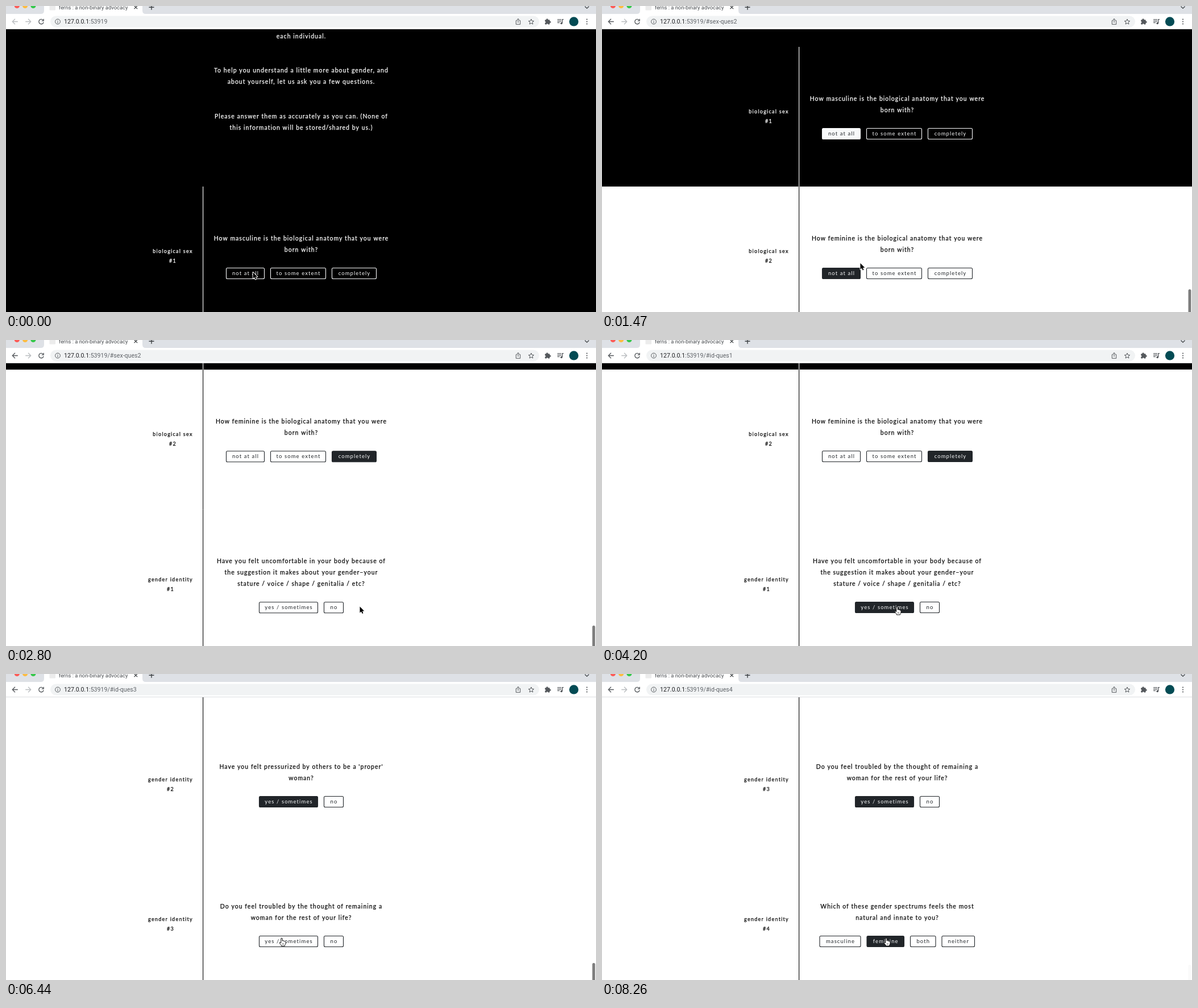
An HTML page with a canvas that plays this animation: 1038 by 539 pixels, repeating every 8.33 s.

```html
<!DOCTYPE html>
<html lang="en">
<head>
<meta charset="utf-8">
<title>Questionnaire</title>
<style>
html, body { margin: 0; width: 100%; height: 100%; overflow: hidden; background: #fff; }
canvas { display: block; width: 1038px; height: 539px; }
</style>
</head>
<body>
<canvas id="stage"></canvas>
<script>
const W = 1038, H = 539, LOOP = 8330, BAR = 41;
const canvas = document.getElementById('stage');
const ctx = canvas.getContext('2d');
const dpr = window.devicePixelRatio || 1;
canvas.width = W * dpr;
canvas.height = H * dpr;

const DARK = [33, 37, 41], LIGHT = [248, 249, 250];
const PAGE_FONT = 'Lato, sans-serif', UI_FONT = 'Roboto, sans-serif';

// Scroll jumps: start time, page offset reached, scrollbar thumb from and to
const SCROLL_MS = 520;
const jumps = [
  { at: 890, to: 246, thumb: [466, 499] },
  { at: 2290, to: 512, thumb: [470, 503] },
  { at: 4465, to: 758, thumb: [473, 506] },
  { at: 5655, to: 1004, thumb: [476, 509] },
  { at: 6775, to: 1250, thumb: [479, 512] }
];
const hashes = ['', '/#sex-ques2', '/#id-ques1', '/#id-ques2', '/#id-ques3', '/#id-ques4'];

// Pointer tip: time, x, y
const pointerPath = [
  [0, 434.5, 469], [1400, 434.5, 469], [1470, 454.5, 453], [1800, 622.5, 469.5],
  [3420, 622.5, 469.5], [3800, 519, 470], [4990, 519, 470], [5180, 515, 471],
  [6200, 515, 471], [6440, 485, 465], [7330, 485, 465], [7560, 500, 465]
];

// Buttons: left, right, text, time filled, time cleared
const degrees = (...marks) => [
  [387, 455, 'not at all'], [465, 563, 'to some extent'], [573, 652, 'completely']
].map((b, i) => b.concat(marks[i] || []));
const yesNo = on => [[445, 549, 'yes / sometimes', on], [559, 594, 'no']];

const sections = [
  { top: 318, h: 246, label: 'biological sex', no: 1, night: true,
    lines: ['How masculine is the biological anatomy that you were', 'born with?'],
    buttons: degrees([60]) },
  { top: 564, h: 246, label: 'biological sex', no: 2,
    lines: ['How feminine is the biological anatomy that you were', 'born with?'],
    buttons: degrees([1310, 1475], [], [1740]) },
  { top: 810, h: 266, label: 'gender identity', no: 1,
    lines: ['Have you felt uncomfortable in your body because of',
      'the suggestion it makes about your gender–your',
      'stature / voice / shape / genitalia / etc?'],
    buttons: yesNo(3760) },
  { top: 1076, h: 246, label: 'gender identity', no: 2,
    lines: ["Have you felt pressurized by others to be a 'proper'", 'woman?'],
    buttons: yesNo(5290) },
  { top: 1322, h: 246, label: 'gender identity', no: 3,
    lines: ['Do you feel troubled by the thought of remaining a', 'woman for the rest of your life?'],
    buttons: yesNo(6440) },
  { top: 1568, h: 246, label: 'gender identity', no: 4,
    lines: ['Which of these gender spectrums feels the most', 'natural and innate to you?'],
    buttons: [[382.5, 455.5, 'masculine'], [465.5, 532, 'feminine', 7560],
      [542, 587.5, 'both'], [597.5, 656, 'neither']] }
];

const intro = [
  [53, 'each individual.'],
  [113.5, 'To help you understand a little more about gender, and'],
  [133.5, 'about yourself, let us ask you a few questions.'],
  [194.5, 'Please answer them as accurately as you can. (None of'],
  [214.5, 'this information will be stored/shared by us.)']
];

const clamp = v => Math.min(1, Math.max(0, v));
const swing = p => 0.5 - Math.cos(Math.PI * clamp(p)) / 2;
const mix = (a, b, k) => `rgb(${a.map((v, i) => Math.round(v + (b[i] - v) * k)).join()})`;

function text(str, x, y, font, color, spacing = 0, align = 'left') {
  ctx.font = font;
  ctx.letterSpacing = spacing + 'px';
  ctx.textAlign = align;
  ctx.fillStyle = color;
  ctx.fillText(str, x, y);
}

// Page copy is a touch heavier than the regular weight
function copy(str, x, y, size, color, spacing) {
  text(str, x, y, `${size}px ${PAGE_FONT}`, color, spacing, 'center');
  ctx.strokeStyle = color;
  ctx.lineWidth = 0.25;
  ctx.strokeText(str, x, y);
}

const bodyLine = (str, y, color) => copy(str, 519.5, y, 10.5, color, 1.03);

function box(x, y, w, h, r, fill) {
  ctx.beginPath();
  ctx.roundRect(x, y, w, h, r);
  ctx.fillStyle = fill;
  ctx.fill();
}

function disc(x, y, r, fill) {
  ctx.beginPath();
  ctx.arc(x, y, r, 0, Math.PI * 2);
  ctx.fillStyle = fill;
  ctx.fill();
}

function stroke(d, x, y, color, width = 1.2) {
  ctx.save();
  ctx.translate(x, y);
  ctx.strokeStyle = color;
  ctx.lineWidth = width;
  ctx.stroke(new Path2D(d));
  ctx.restore();
}

function scrollState(t) {
  let y = 0, thumb = 0, page = 0;
  for (const j of jumps) {
    if (t < j.at) break;
    const p = swing((t - j.at) / SCROLL_MS);
    y += (j.to - y) * p;
    thumb = j.thumb[0] + (j.thumb[1] - j.thumb[0]) * p;
    if (t >= j.at + SCROLL_MS) page++;
  }
  return { y, thumb, page };
}

function pointerAt(t) {
  let i = pointerPath.length - 1;
  while (i > 0 && pointerPath[i][0] > t) i--;
  const a = pointerPath[i], b = pointerPath[i + 1] || a;
  const p = a === b ? 0 : swing((t - a[0]) / (b[0] - a[0]));
  return { x: a[1] + (b[1] - a[1]) * p, y: a[2] + (b[2] - a[2]) * p };
}

function fillLevel(t, on = Infinity, off = Infinity) {
  return swing((t - on) / 150) * (1 - swing((t - off) / 150));
}

const buttonTop = s => s.top + 103 + 20 * s.lines.length;

function drawSection(s, t, scroll) {
  const y = s.top - scroll;
  if (y > H || y + s.h < BAR) return;
  const ink = s.night ? '#fff' : '#0c0c0c';
  const base = s.night ? LIGHT : DARK, other = s.night ? DARK : LIGHT;

  ctx.fillStyle = s.night ? '#f4f4f4' : '#161616';
  ctx.fillRect(346, y, 1.2, s.h);

  s.lines.forEach((line, i) => bodyLine(line, y + 95 + 20 * i, ink));

  const labelX = s.label === 'biological sex' ? 293.5 : 289.5;
  const labelY = y + s.h / 2 - 6.5;
  copy(s.label, labelX, labelY, 9, ink, 1.27);
  copy('#' + s.no, labelX, labelY + 17.3, 9, ink, 1.2);

  const by = buttonTop(s) - scroll;
  const baseColor = mix(base, other, 0);
  for (const [x0, x1, name, on, off] of s.buttons) {
    const k = fillLevel(t, on, off);
    ctx.globalAlpha = k;
    box(x0 + 0.5, by + 0.5, x1 - x0 - 1, 19, 2, baseColor);
    ctx.globalAlpha = 1;
    ctx.strokeStyle = baseColor;
    ctx.lineWidth = 1.1;
    ctx.stroke();
    text(name, (x0 + x1) / 2 + 0.5, by + 13, '9.5px ' + PAGE_FONT, mix(base, other, k), 1.1, 'center');
  }
}

function overButton(p, scroll) {
  return sections.some(s => {
    const y = buttonTop(s) - scroll;
    return p.y >= y && p.y <= y + 20 && s.buttons.some(b => p.x >= b[0] && p.x <= b[1]);
  });
}

const arrow = new Path2D('M0 0V11L2.5 8.7L4.2 12.6L6 11.8L4.4 8H7.8Z');
const hand = new Path2D('M-1.2 0.8Q0 -0.8 1.2 0.8V5Q2.6 4.2 3.4 5.4Q4.8 4.9 5.4 6.1Q7 5.9 7 7.4V9.5Q6.8 11.5 5.6 12.5V14H-0.8V12.6Q-3 10.6 -4 8.3Q-3.6 6.8 -1.2 8.6Z');

function drawPointer(t, scroll) {
  const p = pointerAt(t);
  const isHand = t >= 70 && overButton(p, scroll);
  ctx.save();
  ctx.translate(p.x, p.y);
  ctx.lineJoin = 'round';
  if (isHand) {
    ctx.fillStyle = '#fff';
    ctx.fill(hand);
    ctx.strokeStyle = '#111';
    ctx.lineWidth = 1;
    ctx.stroke(hand);
    stroke('M1.6 9V12M3.3 9V12', 0, 0, '#333', 0.6);
  } else {
    ctx.strokeStyle = '#fff';
    ctx.lineWidth = 1.8;
    ctx.stroke(arrow);
    ctx.fillStyle = '#000';
    ctx.fill(arrow);
  }
  ctx.restore();
}

function drawScrollbar(t, thumb) {
  const shown = (from, to) => clamp((t - from) / 70) * (1 - clamp((t - to) / 240));
  const alpha = Math.max(shown(890, 3560), shown(4465, 8030));
  if (!alpha) return;
  ctx.globalAlpha = alpha;
  box(1031.5, thumb, 5, 60, 2.5, '#7d7d7d');
  ctx.globalAlpha = 1;
}

function drawBrowser(page) {
  const ink = '#54585c';
  ctx.fillStyle = '#dee1e6';
  ctx.fillRect(0, 0, W, 14);
  ctx.fillStyle = '#fff';
  ctx.fillRect(0, 14, W, BAR - 14);
  ctx.fill(new Path2D('M61 14Q67 14 67 8V0H240V8Q240 14 246 14Z'));
  ctx.fillStyle = '#dcdee1';
  ctx.fillRect(0, 40, W, 1);

  ['#fc5b57', '#fdbc40', '#34c84a'].forEach((c, i) => disc(19.3 + 14.3 * i, -0.5, 4.6, c));
  box(76.5, -3, 10.5, 10.5, 1, '#ececec');
  text('ferns : a non-binary advocacy', 93, 5.5, '9.4px ' + UI_FONT, '#45494d');
  stroke('M-2.8 -2.8L2.8 2.8M2.8 -2.8L-2.8 2.8', 228.3, 2.3, '#3c4043', 1.3);
  stroke('M-4.5 0H4.5M0 -4.5V4.5', 256, 2.3, '#3c4043', 1.4);
  stroke('M-3.5 -1.7L0 1.7L3.5 -1.7', 1022, 2.5, '#3c4043', 1.3);

  stroke('M4.8 0H-4.5M0 -4.7L-4.7 0L0 4.7', 16, 27.5, page ? ink : '#b9bcbf', 1.3);
  stroke('M-4.8 0H4.5M0 -4.7L4.7 0L0 4.7', 39, 27.5, '#b9bcbf', 1.3);
  stroke('M3.2 -2.7A4.2 4.2 0 1 0 4.1 1M4.2 -4.8V-1.4H0.8', 62, 27.5, ink, 1.3);

  box(78, 17.5, 860, 20, 10, '#f1f3f4');
  stroke('M4.4 0A4.4 4.4 0 1 1 -4.4 0A4.4 4.4 0 1 1 4.4 0M0 -0.5V2.6M0 -2.5V-1.4', 91, 27.5, ink, 1);
  const host = '127.0.0.1', font = '10.6px ' + UI_FONT;
  text(host, 102, 31.3, font, '#202124');
  text(':53919' + hashes[page], 102 + ctx.measureText(host).width, 31.3, font, '#5f6368');

  stroke('M-1.8 -1.8H-3.7V4.8H3.7V-1.8H1.8M0 2V-5M-2.2 -2.9L0 -5.1L2.2 -2.9', 901, 27.5, ink, 1);
  ctx.beginPath();
  for (let i = 0; i < 10; i++) {
    const a = -Math.PI / 2 + i * Math.PI / 5, r = i % 2 ? 2.2 : 5;
    ctx.lineTo(924 + r * Math.cos(a), 28 + r * Math.sin(a));
  }
  ctx.closePath();
  ctx.strokeStyle = ink;
  ctx.lineWidth = 1;
  ctx.stroke();

  box(948.2, 24.2, 8.4, 8.4, 1, ink);
  disc(952, 23.8, 1.6, ink);
  disc(957, 28.2, 1.6, ink);
  disc(948.2, 28.5, 1.3, '#fff');
  disc(952.3, 32.6, 1.3, '#fff');

  stroke('M-5 -3.5H2M-5 -0.7H2M-5 2.1H-1M3.7 3V-3.6H6', 975, 27.3, ink, 1.3);
  disc(977.2, 30.4, 1.8, ink);
  disc(999, 27.4, 8.1, '#034b54');
  [-4, 0, 4].forEach(d => disc(1022, 27.5 + d, 1.1, ink));
}

function draw(t) {
  const { y: scroll, thumb, page } = scrollState(t);
  ctx.setTransform(dpr, 0, 0, dpr, 0, 0);
  ctx.fillStyle = '#fff';
  ctx.fillRect(0, 0, W, H);
  const edge = Math.min(H, 564 - scroll);
  if (edge > BAR) {
    ctx.fillStyle = '#000';
    ctx.fillRect(0, BAR, W, edge - BAR);
  }
  for (const [y, line] of intro) {
    if (y - scroll > 20) bodyLine(line, y + 3.5 - scroll, '#fff');
  }
  sections.forEach(s => drawSection(s, t, scroll));
  drawScrollbar(t, thumb);
  drawBrowser(page);
  drawPointer(t, scroll);
}

const begin = performance.now();
function tick() {
  draw((performance.now() - begin) % LOOP);
  requestAnimationFrame(tick);
}
tick();
</script>
</body>
</html>
```
